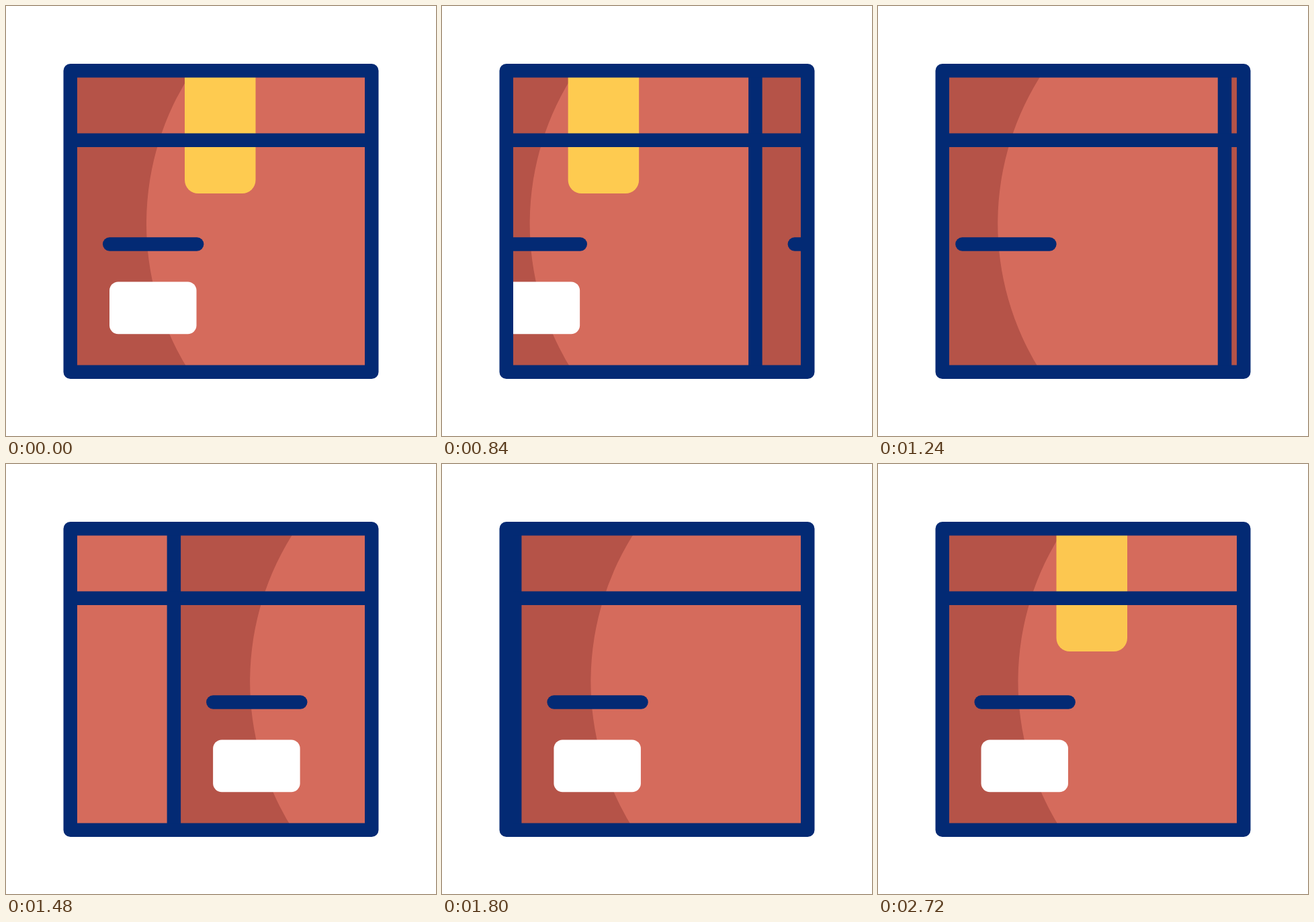
An HTML page for the animation above (3000 ms loop, 640x640 px).

```html
<!DOCTYPE html>
<html lang="en">
<head>
<meta charset="utf-8">
<title>Turning parcel</title>
<style>
  html, body { margin: 0; width: 100%; height: 100%; overflow: hidden; background: #fff; }
  svg { display: block; width: 100vw; height: 100vh; }
  .edge { fill: none; stroke: #032a74; stroke-width: 20.5; stroke-linejoin: round; }
  .round { stroke-linecap: round; }
  .side { fill: #d56b5c; }
  .shade { fill: #b55348; }
  .tape { fill: #fecb50; }
  .label { fill: #fff; }
</style>
</head>
<body>
<svg viewBox="0 0 640 640">
  <defs>
    <clipPath id="box"><rect x="95.75" y="96.25" width="448.5" height="448.5"/></clipPath>
    <path id="shade" class="shade" d="M90 96H278A411 411 0 0 0 273.5 545H90Z"/>
    <path id="tape" class="tape" d="M266 96H371.5V259a20 20 0 0 1-20 20H286a20 20 0 0 1-20-20Z"/>
    <path id="seam" class="edge" d="M95.75 96V545"/>
    <path id="dash" class="edge round" d="M154.2 354.4H284.1"/>
    <rect id="label" class="label" x="154" y="410.5" width="129.5" height="77.7" rx="13"/>
  </defs>
  <g clip-path="url(#box)">
    <rect class="side" x="90" y="90" width="460" height="460"/>
    <g id="faces">
      <g>
        <use href="#shade"/><use href="#tape"/><use href="#seam"/>
        <use href="#dash"/><use href="#label"/>
      </g>
      <g transform="translate(449)">
        <rect class="side" x="95.75" y="90" width="460" height="460"/>
        <use href="#shade" x="-2"/><use href="#seam"/><use href="#dash"/>
      </g>
      <g transform="translate(898)">
        <rect class="side" x="95.75" y="90" width="460" height="460"/>
        <use href="#shade"/><use id="newTape" href="#tape" opacity="0"/>
        <use href="#seam"/><use href="#dash"/><use href="#label"/>
      </g>
    </g>
  </g>
  <path class="edge" d="M95.75 199.75H544.25M95.75 96.25H544.25V544.75H95.75Z"/>
</svg>
<script>
const LOOP = 3000, STEP = 40;
const TURN = { start: 480, length: 1480, distance: 898.5 };
const FADE = { start: 2160, length: 560, opacity: 0.96 };

const faces = document.getElementById('faces');
const newTape = document.getElementById('newTape');

const progress = (t, { start, length }) =>
  Math.min(1, Math.max(0, (t - start) / length));

// cubic-bezier(.55, 0, .448, 1), solved by bisection
function ease(x) {
  if (x <= 0 || x >= 1) return x;
  let lo = 0, hi = 1;
  for (let i = 0; i < 30; i++) {
    const p = (lo + hi) / 2, q = 1 - p;
    if (1.65 * p * q * q + 1.344 * p * p * q + p ** 3 < x) lo = p;
    else hi = p;
  }
  return lo * lo * (3 - 2 * lo);
}

function draw(now) {
  const t = Math.floor((now % LOOP) / STEP) * STEP;
  const shift = TURN.distance * ease(progress(t, TURN));
  faces.setAttribute('transform', `translate(${-shift.toFixed(3)})`);
  newTape.setAttribute('opacity', FADE.opacity * progress(t, FADE));
}

let origin;
function tick(now) {
  origin ??= now;
  draw(Math.max(0, now - origin));
  requestAnimationFrame(tick);
}
draw(0);
requestAnimationFrame(tick);
</script>
</body>
</html>
```
